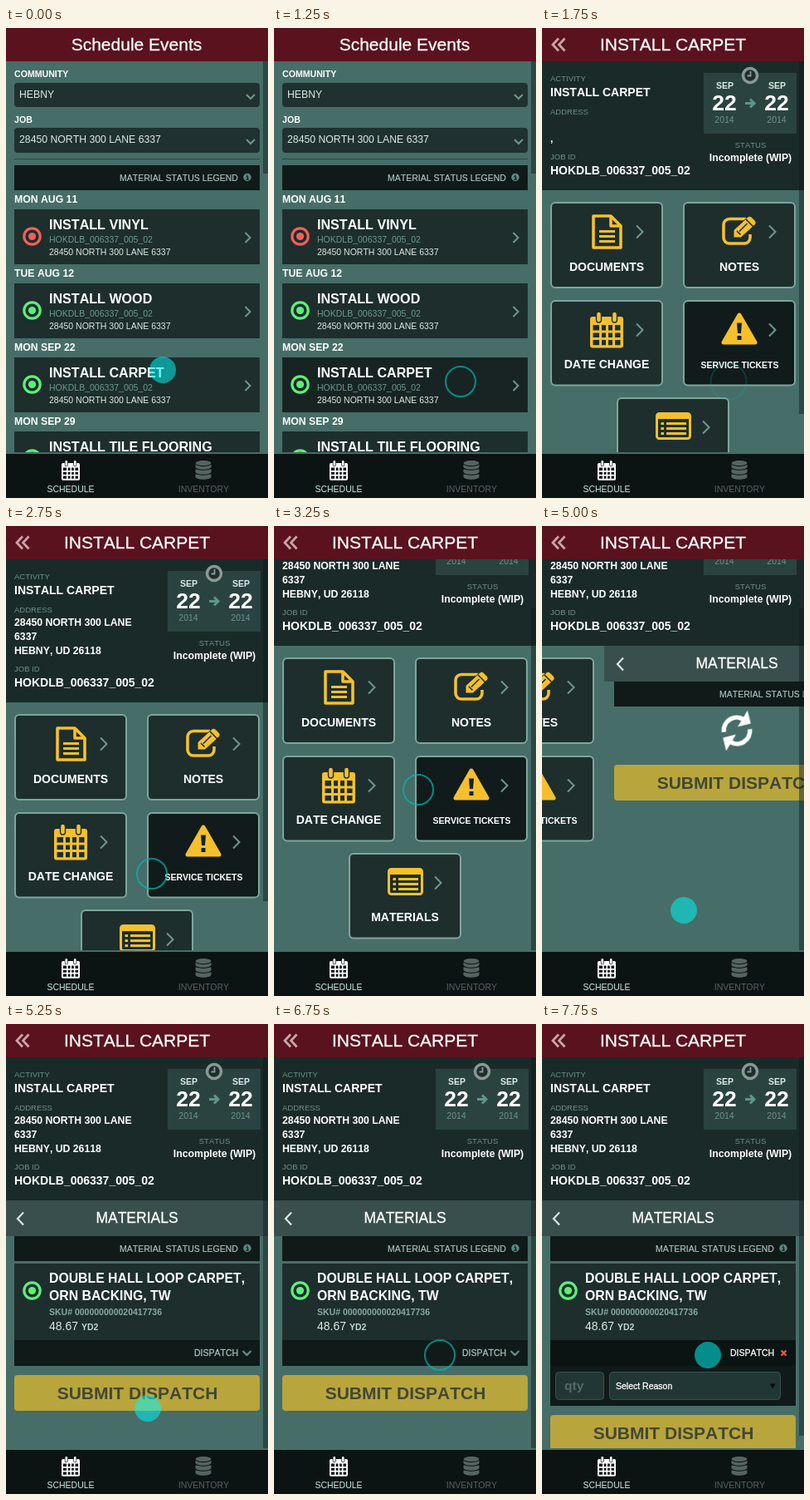
Recreate the animation shown at these times as an HTML page. Size 316 by 565 pixels, loop 8 s.

```html
<!DOCTYPE html>
<html lang="en">
<head>
<meta charset="utf-8">
<title>Schedule</title>
<style>
html, body { margin: 0; width: 100%; height: 100%; overflow: hidden; background: #466d67; }
svg { display: block; width: 100%; height: 100%; }
text { font-family: "Liberation Sans", Arial, sans-serif; font-size: 10.5px; font-kerning: none; fill: #fff; white-space: pre; }
.s { font-size: 9.5px; }
.l { font-size: 12.25px; }
.xl { font-size: 14px; }
.h { font-size: 16.1px; }
.t { font-size: 21px; }
.b { font-weight: bold; }
.m { text-anchor: middle; }
.heavy { stroke: #fff; stroke-width: .3px; }
.soft { fill: #dcebe6; }
.pale { fill: #a9c4bd; stroke: #a9c4bd; stroke-width: .2px; }
.dim { fill: #6f918c; }
.teal { fill: #6b9a92; }
.dark { fill: #1d2e2d; }
.deep { fill: #0f1a19; }
.line { fill: none; stroke: #719690; stroke-width: 2; }
.btn rect { stroke: #7fa59d; stroke-width: 2; }
.icon { color: #f6c02c; }

/* Every change is a hard cut on a 250 ms grid. */
.a, .a * { animation: 8s step-end infinite; }
#list, #home { animation-name: list; }
#detail, #sub { animation-name: detail; }
#empty { animation-name: empty; }
#addr { animation-name: addr; }
#down { animation-name: down; }
#scroll { animation-name: scroll; }
#grid { animation-name: grid; }
#mat { animation-name: mat; }
#spin { animation-name: spin; }
#item { animation-name: item; }
#submit { animation-name: submit; }
#form { animation-name: form; }
#closed { animation-name: closed; }
#open, #panel { animation-name: open; }
#label { animation-name: label; }
#bar { animation-name: bar; }
#row3 { animation-name: row; }
#ticket { animation-name: ticket; }
#stock { animation-name: stock; }
#thumb { animation-name: thumb; }
#touch { animation-name: move; }
#disc { animation-name: disc; }
#ring { animation-name: ring; }

@keyframes list { 0% { opacity: 1 } 21.875% { opacity: 0 } }
@keyframes detail { 0% { opacity: 0 } 21.875% { opacity: 1 } }
@keyframes empty { 0% { opacity: 1 } 25% { opacity: 0 } }
@keyframes addr { 0% { opacity: 0 } 25% { opacity: 1 } }
@keyframes down { 0% { transform: none } 25% { transform: translateY(17px) } }
@keyframes scroll {
  0% { transform: none }
  37.5% { transform: translateY(-43px) }
  40.625% { transform: translateY(-68px) }
  65.625% { transform: none }
}
@keyframes grid {
  0% { transform: none; opacity: 1 }
  62.5% { transform: translateX(-243px); opacity: 1 }
  65.625% { transform: none; opacity: 0 }
}
@keyframes mat {
  0% { transform: none; opacity: 0 }
  62.5% { transform: translateX(77px); opacity: 1 }
  65.625% { transform: none; opacity: 1 }
}
@keyframes spin { 0% { opacity: 1 } 65.625% { opacity: 0 } }
@keyframes item { 0% { opacity: 0 } 65.625% { opacity: 1 } }
@keyframes submit {
  0% { transform: translateY(-67px) }
  65.625% { transform: none }
  93.75% { transform: translateY(48px) }
}
@keyframes form { 0% { opacity: 0 } 93.75% { opacity: .4 } 96.875% { opacity: 1 } }
@keyframes closed { 0% { opacity: 1 } 93.75% { opacity: 0 } }
@keyframes open { 0% { opacity: 0 } 93.75% { opacity: 1 } }
@keyframes label {
  0% { fill: #a9beb9; stroke: #a9beb9 }
  87.5% { fill: #d0deda; stroke: #d0deda }
  93.75% { fill: #fff; stroke: #fff }
}
@keyframes bar { 0% { fill: #0f1a19 } 87.5% { fill: #0b1413 } }
@keyframes row { 0% { fill: #1d2e2d } 15.625% { fill: #172423 } 18.75% { fill: #111b1b } }
@keyframes ticket { 0% { fill: #111b1b } 56.25% { fill: #172423 } 59.375% { fill: #1d2e2d } }
@keyframes stock { 0% { fill: #1d2e2d } 56.25% { fill: #172423 } 59.375% { fill: #111b1b } }
@keyframes thumb {
  0% { y: 40px; height: 135px }
  21.875% { y: 40px; height: 424px }
  25% { y: 40px; height: 411px }
  37.5% { y: 77px; height: 411px }
  40.625% { y: 99px; height: 411px }
  65.625% { y: 40px; height: 470px }
  93.75% { y: 40px; height: 455px }
}
@keyframes move {
  0% { transform: translate(189px, 411px) }
  3.125% { transform: translate(225px, 425px) }
  31.25% { transform: translate(196px, 419px) }
  34.375% { transform: translate(176px, 418px) }
  37.5% { transform: translate(175px, 375px) }
  40.625% { transform: translate(174px, 317px) }
  43.75% { transform: translate(174px, 303px) }
  46.875% { transform: translate(176px, 427px) }
  50% { transform: translate(172px, 462px) }
  53.125% { transform: translate(171px, 462px) }
  71.875% { transform: translate(189px, 401px) }
  78.125% { transform: translate(200px, 398px) }
}
@keyframes disc {
  0%, 25%, 46.875%, 62.5%, 93.75% { opacity: .53 }
  15.625%, 34.375%, 53.125%, 84.375% { opacity: 0 }
}
@keyframes ring {
  0%, 25%, 46.875%, 62.5%, 93.75% { r: 18px; opacity: 0 }
  15.625%, 34.375%, 53.125%, 84.375% { r: 18px; opacity: .7 }
  18.75%, 56.25%, 87.5% { r: 20px; opacity: .45 }
  21.875%, 59.375%, 90.625% { r: 21.5px; opacity: .2 }
}
</style>
</head>
<body>
<svg viewBox="0 0 316 565">
<defs>
  <path id="chev" class="line" d="M0 0l6 6-6 6"/>
  <path id="chevbig" class="line" d="M0 0l7.5 7.5-7.5 7.5"/>
  <path id="caret" class="line" d="M0 0l5 5 5-5"/>
  <g id="target">
    <circle r="9.7" fill="none" stroke="currentColor" stroke-width="3.2"/>
    <circle r="4.6" fill="currentColor"/>
  </g>
  <g id="info">
    <circle r="4.7" fill="#5f8a84"/>
    <path d="M-1.5-.6H.6V2.4M-1.7 2.6H1.9M-.2-3.2V-1.7" fill="none" stroke="#0f1a19" stroke-width="1.3"/>
  </g>
  <g id="entry">
    <use href="#target" x="31.5" y="32.5"/>
    <text class="teal" x="52" y="40">HOKDLB_006337_005_02</text>
    <text class="soft" x="52" y="55">28450 NORTH 300 LANE 6337</text>
    <use href="#chev" x="288.5" y="28"/>
  </g>
  <g id="cal">
    <path d="M3 5.500h34q3 0 3 3V40q0 3-3 3H3q-3 0-3-3V8.500q0-3 3-3zM3.500 15.500v6.500H11v-6.500zm10.500 0v6.500h5v-6.500zm8 0v6.500h5v-6.500zm8 0v6.500h6.500v-6.500zM3.500 25v5.500H11V25zM14 25v5.500h5V25zM22 25v5.500h5V25zM30 25v5.500h6.500V25zM3.500 33.500v6.200H11v-6.200zm10.500 0v6.200h5v-6.200zm8 0v6.200h5v-6.200zm8 0v6.200h6.500v-6.200z" fill="currentColor" fill-rule="evenodd"/>
    <path d="M10.500 3v6.500M29.500 3v6.500" stroke="#1d2e2d" stroke-width="7.400" stroke-linecap="round"/>
    <path d="M10.500 2.500v7M29.500 2.500v7" stroke="currentColor" stroke-width="4.600" stroke-linecap="round"/>
  </g>
  <g id="legend">
    <rect class="deep" x="10" width="296" height="30"/>
    <text class="pale" x="137" y="19">MATERIAL STATUS LEGEND</text>
    <use href="#info" x="291" y="14.500"/>
  </g>
</defs>

<rect width="316" height="565" fill="#466d67"/>

<g class="a">
<g id="list">
  <text class="b" x="10" y="59" style="font-size:10.6px">COMMUNITY</text>
  <rect x="10" y="66" width="296" height="29" rx="4" fill="#1f3130"/>
  <text class="l soft" x="16" y="84">HEBNY</text>
  <use href="#caret" x="290" y="80"/>
  <text class="b" x="10" y="114" style="font-size:10.6px">JOB</text>
  <rect x="10" y="120" width="296" height="30" rx="4" fill="#1f3130"/>
  <text class="l soft" x="16" y="138">28450 NORTH 300 LANE 6337</text>
  <use href="#caret" x="290" y="134"/>
  <path d="M10 157.500H306" stroke="#2b4643"/>
  <use href="#legend" y="165"/>
  <text class="l b" x="10" y="210">MON AUG 11</text>
  <text class="l b" x="10" y="299">TUE AUG 12</text>
  <text class="l b" x="10" y="388">MON SEP 22</text>
  <text class="l b" x="10" y="477">MON SEP 29</text>
  <rect class="dark" x="10" y="218" width="296" height="66"/>
  <rect class="dark" x="10" y="307" width="296" height="66"/>
  <rect class="dark" id="row3" x="10" y="396" width="296" height="66"/>
  <rect class="dark" x="10" y="485" width="296" height="25"/>
  <text class="h b" x="52" y="242">INSTALL VINYL</text>
  <text class="h b" x="52" y="331">INSTALL WOOD</text>
  <text class="h b" x="52" y="420">INSTALL CARPET</text>
  <text class="h b" x="52" y="509">INSTALL TILE FLOORING</text>
  <use href="#entry" y="218" color="#f35f58"/>
  <g color="#5cf079">
    <use href="#entry" y="307"/>
    <use href="#entry" y="396"/>
    <use href="#entry" y="485"/>
  </g>
</g>

<g id="detail">
<g id="scroll">
  <rect y="40" width="316" height="690" fill="#466d67"/>
  <rect y="40" width="316" height="172" fill="#1a2a29"/>
  <text class="s dim" x="10" y="64">ACTIVITY</text>
  <text class="xl b" x="10" y="82">INSTALL CARPET</text>
  <text class="s dim" x="10" y="104">ADDRESS</text>
  <text class="l b" id="empty" x="10" y="137">,</text>
  <g id="addr">
    <text class="l b" x="10" y="120">28450 NORTH 300 LANE</text>
    <text class="l b" x="10" y="137">6337</text>
    <text class="l b" x="10" y="154">HEBNY, UD 26118</text>
  </g>
  <rect x="195" y="54" width="112" height="73" fill="#2a4341"/>
  <circle cx="251" cy="57" r="8.500" fill="#1d2e2d" stroke="#899996" stroke-width="3.500"/>
  <path d="M251.500 52v5.500H247.500" fill="none" stroke="#899996" stroke-width="1.800"/>
  <path d="M245 90.500h9M251 85.500l5 5-5 5" fill="none" stroke="#5f958b" stroke-width="3"/>
  <g class="m">
    <text class="b soft" x="220.500" y="73">SEP</text>
    <text class="b soft" x="283.500" y="73">SEP</text>
    <text class="b" x="220" y="99" style="font-size:26.5px">22</text>
    <text class="b" x="283" y="99" style="font-size:26.5px">22</text>
    <text class="dim" x="220" y="114">2014</text>
    <text class="dim" x="283" y="114">2014</text>
    <text class="s dim" x="251.500" y="144">STATUS</text>
    <text class="l b" x="251.500" y="160">Incomplete (WIP)</text>
  </g>

  <g id="down">
    <rect y="195" width="316" height="535" fill="#466d67"/>
    <text class="s dim" x="10" y="158">JOB ID</text>
    <text class="xl b" x="10" y="176">HOKDLB_006337_005_02</text>
    <g id="grid">
      <g class="btn" transform="translate(10 209)">
        <rect class="dark" x="1" y="1" width="134" height="102" rx="5"/>
        <use href="#chevbig" x="104" y="28.500"/>
        <g class="icon" transform="translate(50 15)" fill="none" stroke="currentColor" stroke-width="3.600" stroke-linejoin="round">
          <path d="M2 2H23L35 14V40H2zM23 2V14H35"/>
          <path d="M9 20.500H28M9 26.500H28M9 32.500H28" stroke-width="3"/>
        </g>
        <text class="xl b m" x="68" y="83">DOCUMENTS</text>
      </g>
      <g class="btn" transform="translate(170 209)">
        <rect class="dark" x="1" y="1" width="134" height="102" rx="5"/>
        <use href="#chevbig" x="104" y="28.500"/>
        <g class="icon" transform="translate(47 17)">
          <path d="M29 3.500H9a7 7 0 0 0-7 7V26a7 7 0 0 0 7 7H27a7 7 0 0 0 7-7V22" fill="none" stroke="currentColor" stroke-width="3.600"/>
          <path d="M14 26v-9L31.500 1q2-1.500 4 0l5 5q1.500 2 0 4L23 26z" fill="currentColor" stroke="#1d2e2d"/>
          <path d="M29 4l9 9M18 18l4.500 4.500M21 18.500l9.500-9.500" stroke="#1d2e2d" stroke-width="1.600"/>
        </g>
        <text class="xl b m" x="68" y="83">NOTES</text>
      </g>
      <g class="btn" transform="translate(10 327)">
        <rect class="dark" x="1" y="1" width="134" height="101.500" rx="5"/>
        <use href="#chevbig" x="104" y="28.500"/>
        <g class="icon"><use href="#cal" x="48" y="14.500"/></g>
        <text class="xl b m" x="68" y="82">DATE CHANGE</text>
      </g>
      <g class="btn" transform="translate(170 327)">
        <rect class="dark" id="ticket" x="1" y="1" width="134" height="101.500" rx="5"/>
        <use href="#chevbig" x="104" y="28.500"/>
        <g class="icon" transform="translate(46 15)">
          <path d="M22 3L41 36H3z" fill="currentColor" stroke="currentColor" stroke-width="5" stroke-linejoin="round"/>
          <path d="M19 12.500h6l-1 12.500h-4zM19.500 28h5v5h-5z" fill="#152120"/>
        </g>
        <text class="b m" x="68.500" y="82">SERVICE TICKETS</text>
      </g>
      <g class="btn" transform="translate(90 444)">
        <rect class="dark" id="stock" x="1" y="1" width="134" height="101.500" rx="5"/>
        <use href="#chevbig" x="104" y="28.500"/>
        <g class="icon" transform="translate(47 18)" fill="none" stroke="currentColor" stroke-width="3">
          <rect x="1.500" y="1.500" width="40" height="30" rx="3" style="stroke:currentColor;stroke-width:3"/>
          <path d="M2 5H41" stroke-width="6"/>
          <path d="M6.500 13.500h3.500M13 13.500H37M6.500 19.500h3.500M13 19.500H37M6.500 25.500h3.500M13 25.500H37"/>
        </g>
        <text class="xl b m" x="68" y="82">MATERIALS</text>
      </g>
    </g>
  </g>

  <g id="mat">
    <rect x="-2" y="212" width="320" height="43" fill="#384f4d"/>
    <path d="M21 226.500l-7 7.500 7 7.500" fill="none" stroke="#dde8e5" stroke-width="2.200"/>
    <text class="m heavy" x="158" y="239" style="font-size:17.5px">MATERIALS</text>
    <use href="#legend" y="255"/>
    <g id="spin">
      <g transform="translate(158 314) rotate(-14) scale(1.08)" fill="none" stroke="#fff" stroke-width="5">
        <path d="M-14.500-2a14.500 14.500 0 0 1 25-8M14.500 2a14.500 14.500 0 0 1-25 8"/>
        <path d="M17-19v15h-15zM-17 19v-15h15z" fill="#fff" stroke="none"/>
      </g>
    </g>
    <g id="item">
      <rect class="dark" x="10" y="288" width="296" height="92"/>
      <rect id="bar" x="10" y="380" width="296" height="31"/>
      <use href="#target" x="31.500" y="320.500" color="#5cf079"/>
      <g class="b">
        <text x="52" y="311" style="font-size:15.8px">DOUBLE HALL LOOP CARPET,</text>
        <text x="52" y="332" style="font-size:15.8px">ORN BACKING, TW</text>
        <text x="52" y="350" style="fill:#87aaa3">SKU# 000000000020417736</text>
        <text x="91" y="368" style="fill:#c3d8d2">YD2</text>
      </g>
      <text class="xl soft" x="52" y="368">48.67</text>
      <text id="label" x="227" y="399" stroke-width=".3">DISPATCH</text>
      <use id="closed" href="#caret" x="285.500" y="393"/>
      <path id="open" d="M288.500 392.500l6 6m0-6l-6 6" stroke="#e8574f" stroke-width="2.400"/>
      <rect class="deep" id="panel" x="10" y="411" width="296" height="48"/>
      <g id="form">
        <g fill="#213735" stroke="#385350">
          <rect x="16.500" y="418.500" width="58" height="33" rx="4"/>
          <rect x="81.500" y="418.500" width="206" height="33" rx="4"/>
        </g>
        <text class="b" x="27" y="440" style="font-size:15.5px;fill:#566b68">qty</text>
        <text class="heavy" x="89" y="439">Select Reason</text>
        <path d="M275 432.500h6.500l-3.250 6z" fill="#050909"/>
      </g>
    </g>
    <g id="submit">
      <rect x="10" y="422" width="296" height="43" rx="4" fill="#b8a53c"/>
      <text class="t b m" x="158.500" y="451" style="fill:#424832">SUBMIT DISPATCH</text>
    </g>
  </g>
</g>
</g>

<rect id="thumb" x="310" y="40" width="6" height="135" fill="#0c1b1b" opacity=".45"/>
</g>

<rect width="316" height="40" fill="#5a121e"/>
<g class="a">
  <text class="t m heavy" id="home" x="157.500" y="27">Schedule Events</text>
  <g id="sub">
    <text class="t m heavy" x="158" y="27">INSTALL CARPET</text>
    <path d="M20 12.500l-7 7.500 7 7.500M27.500 12.500l-7 7.500 7 7.500" fill="none" stroke="#c9a4aa" stroke-width="2.800"/>
  </g>
</g>

<rect y="510" width="316" height="2" fill="#466d67"/>
<rect y="512" width="316" height="53" fill="#0b1313"/>
<g transform="translate(67 520) scale(.55)" color="#fff"><use href="#cal"/></g>
<text class="m" x="78" y="558" style="fill:#c9eee3">SCHEDULE</text>
<g fill="#566461" stroke="#0b1313">
  <path d="M228 536v3.500c0 5 20 5 20 0V536z"/>
  <path d="M228 530v3.500c0 5 20 5 20 0V530z"/>
  <path d="M228 524v3.500c0 5 20 5 20 0V524z"/>
  <ellipse cx="238" cy="523" rx="10" ry="3.600"/>
</g>
<text class="m" x="238.500" y="558" style="fill:#566461">INVENTORY</text>

<g class="a">
  <g id="touch">
    <circle id="disc" r="16" fill="#00f8f8"/>
    <circle id="ring" r="18" fill="none" stroke="#00b8b8" stroke-width="2"/>
  </g>
</g>
</svg>
</body>
</html>
```
